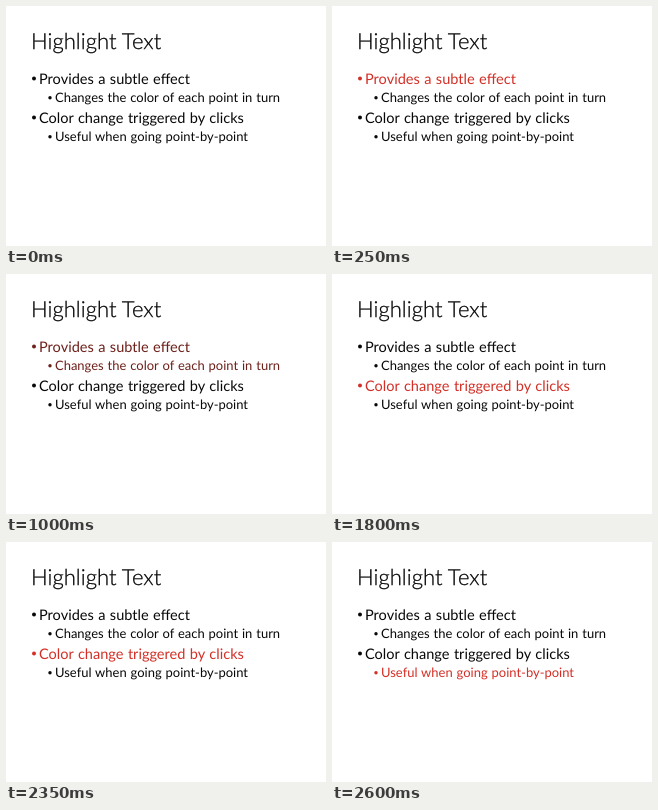
An HTML page for the animation above (3.35 s loop, 320x240 px).

```html
<!DOCTYPE html>
<html lang="en">
<head>
<meta charset="utf-8">
<title>Highlight Text</title>
<style>
  html, body { margin: 0; width: 100%; height: 100%; overflow: hidden; background: #fff; }
  svg { display: block; width: 320px; height: 240px; }
  text { font-family: Lato, Carlito, sans-serif; text-rendering: geometricPrecision; white-space: pre; }
  .title { font-size: 22.1px; font-weight: 300; fill: #000; stroke: #000; stroke-width: .25px; }
  .point { font-size: 14.55px; word-spacing: .7px; }
  .detail { font-size: 12.97px; word-spacing: .6px; }

  g {
    --ink: #080808;
    --mid: #6e201a;
    --red: #d32f26;
    fill: var(--ink);
    animation: 3350ms step-end infinite;
  }
  #one { animation-name: one; }
  #two { animation-name: two; }
  #three { animation-name: three; }
  #four { animation-name: four; }

  /* 200, 250, 1000, 1050, 1800 and 2600 ms of the loop */
  @keyframes one {
    0% { fill: var(--ink); }
    5.97% { fill: var(--mid); }
    7.462% { fill: var(--red); }
    29.85% { fill: var(--mid); }
    31.343%, 100% { fill: var(--ink); }
  }
  @keyframes two {
    0% { fill: var(--ink); }
    29.85% { fill: var(--mid); }
    31.343% { fill: var(--red); }
    53.731%, 100% { fill: var(--ink); }
  }
  @keyframes three {
    0% { fill: var(--ink); }
    53.731% { fill: var(--red); }
    77.611%, 100% { fill: var(--ink); }
  }
  @keyframes four {
    0% { fill: var(--ink); }
    77.611%, 100% { fill: var(--red); }
  }
</style>
</head>
<body>
<svg viewBox="0 0 320 240">
  <text class="title" x="25" y="43">Highlight Text</text>
  <g id="one">
    <circle cx="28" cy="72.5" r="2"/>
    <text class="point" x="33" y="78">Provides a subtle effect</text>
  </g>
  <g id="two">
    <circle cx="44" cy="91.7" r="1.7"/>
    <text class="detail" x="49" y="96">Changes the color of each point in turn</text>
  </g>
  <g id="three">
    <circle cx="28" cy="111.5" r="2"/>
    <text class="point" x="33" y="117">Color change triggered by clicks</text>
  </g>
  <g id="four">
    <circle cx="44" cy="130.7" r="1.7"/>
    <text class="detail" x="49" y="135">Useful when going point-by-point</text>
  </g>
</svg>
</body>
</html>
```
